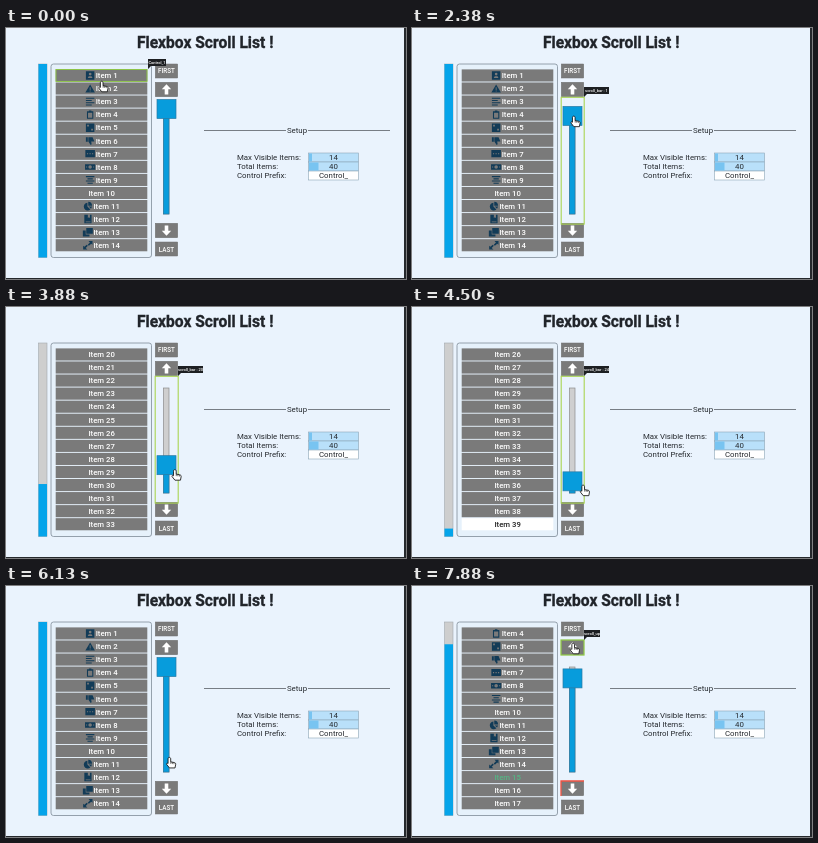
Write an HTML page that moves like this. It is 400 px wide and 251 px high and loops after 8 s.

```html
<!DOCTYPE html>
<html lang="en">
<head>
<meta charset="utf-8">
<title>Flexbox Scroll List</title>
<style>
html, body { margin: 0; width: 100%; height: 100%; overflow: hidden; background: #eaf3fd; }
svg { display: block; width: 100%; height: 100%; font-family: Roboto, Arial, sans-serif; }
</style>
</head>
<body>
<svg id="stage" viewBox="0 0 400 251">
  <rect width="400" height="251" fill="#eaf3fd"/>
  <path d="M398 0h2v251H0v-1h398z" fill="#25282c"/>
  <text x="199.2" y="20.4" font-size="15.6" font-weight="700" text-anchor="middle" fill="#20242a" stroke="#20242a" stroke-width=".35">Flexbox Scroll List !</text>
  <g fill="none" stroke="#5a6068" stroke-width=".8"><path d="M198 102.5H280M302 102.5H384"/></g>
  <g font-size="7.85" fill="#24282d">
    <text x="291" y="105.3" text-anchor="middle">Setup</text>
    <text x="231" y="132.2">Max Visible Items:</text>
    <text x="231" y="141.2">Total Items:</text>
    <text x="231" y="150.3">Control Prefix:</text>
  </g>
  <g stroke="#8ba3b5" stroke-width=".6">
    <rect x="302.5" y="125" width="50" height="9" fill="#b9e0fa"/>
    <rect x="302.5" y="134" width="50" height="9" fill="#b9e0fa"/>
    <rect x="302.5" y="143" width="50" height="9" fill="#fff"/>
  </g>
  <path d="M303 125.5h3v8h-3zM303 134.5h9.5v8h-9.5z" fill="#78c4f1"/>
  <g font-size="7.85" fill="#24282d" text-anchor="middle">
    <text x="327.5" y="132.2">14</text>
    <text x="327.5" y="141.2">40</text>
    <text x="327.5" y="150.3">Control_</text>
  </g>
  <rect x="45" y="36" width="100.5" height="193.5" rx="2.5" fill="#e6f1fb" stroke="#7f8c98" stroke-width=".8"/>
  <g id="live"></g>
  <g id="hand">
    <path d="M0 .3C1.2 .3 1.6 1 1.6 2V5L5.5 5.8C6.6 6 7 6.7 6.9 7.7L6.2 11.5H.3L-2.7 7.7C-3.3 6.7-2 5.9-1.2 6.8V2C-1.2 1-.9 .3 0 .3Z" fill="#fff" stroke="#111" stroke-width=".9"/>
    <path d="M1.7 5V7.2M3.4 5.5V7.4M5.1 6V7.6" stroke="#111" stroke-width=".6"/>
  </g>
</svg>
<script>
const LOOP = 8000, ROWS = 14, TOTAL = 40, PITCH = 13.06;
const BLUE = '#079cdc', BAR_BLUE = '#05a4ea', GRAY = '#7a7a7a', NAVY = '#123b57';
const GREEN = '#8cc63f', ORANGE = '#f2703a';

// Glyphs live in an 8 x 8 box.
const ICONS = {
  1: 'M0 0H8V8H0ZM4 1.4A1.3 1.3 0 0 0 4 4A1.3 1.3 0 0 0 4 1.4ZM1.7 6.5H6.3L5.3 4.7H2.7Z',
  2: 'M4 .2L8.5 7.8H-.5ZM3.6 2.8V5.3H4.4V2.8ZM3.6 6V6.9H4.4V6Z',
  3: 'M0 .4H8V1.4H0ZM0 2.5H5.5V3.5H0ZM0 4.6H8V5.6H0ZM0 6.7H5.5V7.7H0Z',
  4: 'M1 .8H2.8V0H5.2V.8H7V8H1ZM2 2.2V7H6V2.2Z',
  5: 'M0 0H8V8H0ZM1.2 1.2V2.8H2.8V1.2ZM5 5V6.6H6.6V5Z',
  6: 'M0 .8H1.8V5H0ZM2.3 .6H6.3L8 4.8H5L5.4 7.2L4.5 8L2.3 4.6Z',
  7: 'M-.5 .5H8.5V7.2H-.5ZM1 3.4V4.5H2.1V3.4ZM3.4 3.4V4.5H4.5V3.4ZM5.8 3.4V4.5H6.9V3.4Z',
  8: 'M-.8 1.5H8.8V6.7H-.8ZM4 2.4A1.7 1.7 0 0 0 4 5.8A1.7 1.7 0 0 0 4 2.4ZM.2 3.6V4.6H1.2V3.6ZM6.8 3.6V4.6H7.8V3.6Z',
  9: 'M0 .4H8V1.4H0ZM1.5 2.5H6.5V3.5H1.5ZM0 4.6H8V5.6H0ZM1.5 6.7H6.5V7.7H1.5Z',
  11: 'M3.6 .8V4.5L6.4 7.2A3.7 3.7 0 1 1 3.6 .8ZM4.4 0A3.8 3.8 0 0 1 8 3.7H4.4ZM4.8 4.5H8L7 6.6Z',
  12: 'M.7 0H7.5V8H.7ZM2 6.2V7H6.5V6.2ZM4 0V3L5 2.2L6 3V0Z',
  13: 'M2.5 0H8.7V5.6H2.5ZM-.7 2.4H2V6.1H5.5V8H-.7Z',
  14: 'M4.6 0H8.4V3.6L7.2 2.5L5 4.6L3.9 3.5L6 1.4ZM3.6 8H-.4V4.4L.8 5.5L2.9 3.5L4 4.6L2 6.6Z'
};

const VALUE = [[2250, 0], [3250, 14], [4350, 25], [4500, 24.6], [5230, 0]];
const POINTER = [
  [0, 95.5, 53], [700, 95.5, 53], [1100, 97.5, 65], [1500, 97.5, 65], [2050, 161, 80], [2250, 161, 80],
  [3250, 165.5, 140], [4350, 171, 179], [4500, 171, 178], [5250, 168.5, 71],
  [5600, 168.5, 71], [6300, 161.5, 203], [7330, 161.5, 203], [7750, 161, 57], [8000, 161, 57]
];
const CLICKS = [6720, 7000, 7230];

function sample(keys, t, column = 1) {
  const next = keys.findIndex(k => k[0] > t);
  if (next === 0) return keys[0][column];
  if (next < 0) return keys[keys.length - 1][column];
  const a = keys[next - 1], b = keys[next];
  return a[column] + (b[column] - a[column]) * (t - a[0]) / (b[0] - a[0]);
}

const scrollValue = t => sample(VALUE, t) + CLICKS.filter(c => t >= c).length;

const rect = (x, y, w, h, fill, stroke = 'none', sw = .7) =>
  `<rect x="${x}" y="${y}" width="${w}" height="${h}" fill="${fill}" stroke="${stroke}" stroke-width="${sw}"/>`;

const label = (x, y, size, text, fill = '#fff', anchor = 'middle') =>
  `<text x="${x}" y="${y}" font-size="${size}" font-weight="500" fill="${fill}" text-anchor="${anchor}">${text}</text>`;

function listRow(row, first) {
  const n = first + row, y = 41.4 + row * PITCH, icon = ICONS[n];
  const white = n === 39;
  const ink = white ? '#222' : n === 15 ? '#55b585' : '#fff';
  const textWidth = n < 10 ? 21.8 : 26.4;
  const left = 95.7 - (textWidth + 9) / 2;
  let out = rect(49.7, y, 91.6, 12.1, white ? '#fff' : GRAY);
  if (icon) {
    out += `<path transform="translate(${left - .4} ${y + 1.8}) scale(1.06)" d="${icon}" fill="${NAVY}" fill-rule="evenodd"/>`;
    out += label(left + 9.4, y + 8.8, 7.75, `Item ${n}`, ink, 'start');
  } else {
    out += label(95.6, y + 8.8, 7.75, `Item ${n}`, ink);
  }
  return out;
}

function button(y, h, content, fill = GRAY) {
  return rect(149.3, y, 22.4, h, fill, '#6e6e6e', .5) + content;
}

function arrow(y, dir) {
  return `<path transform="translate(160.5 ${y}) scale(1 ${dir})" d="M0-5.3L4.7-.3H1.8V5H-1.8V-.3H-4.7Z" fill="#fff"/>`;
}

function tooltip(x, y, w, text) {
  return `<path d="M${x} ${y}h${w}v7h${-w + 3}l-3 3z" fill="#1d1f22"/>` +
    label(x + w / 2, y + 5, 4, text);
}

const outline = (x, y, w, h, color, sw = 1.2) => rect(x, y, w, h, 'none', color, sw);

function hoverLayer(t, value) {
  if (t < 1000) return outline(50, 41.5, 91, 11.9, GREEN, .9) + tooltip(142, 31, 18, 'Control_1');
  if (t < 1600) {
    const color = t >= 1150 && t < 1450 ? ORANGE : GREEN;
    return outline(49.5, 54.4, 92, 12.4, color) + tooltip(142, 44, 18, 'Control_2');
  }
  if (t >= 2000 && t < 5800) {
    return outline(149.2, 69.3, 23, 126.8, '#a9d552', 1.1) +
      tooltip(172, 59, 25, `scroll_bar : ${Math.max(1, Math.floor(value))}`);
  }
  if (t >= 6200 && t < 7420) return outline(149, 195, 23, 15, GREEN) + tooltip(172, 185, 21, 'scroll_down');
  if (t >= 7650) return outline(149, 54, 23, 15, GREEN) + tooltip(172, 44, 16, 'scroll_up');
  return '';
}

function controls(t, value) {
  const center = 81 + value * 3.8;
  const pressed = CLICKS.some(c => t >= c && t < c + 190);
  return button(36, 14, label(160.5, 45.4, 6.3, 'FIRST')) +
    button(54.3, 14.4, arrow(61.6, 1)) +
    rect(157.5, 81, 5.5, 105, '#cfcfcf', '#8b8b8b') +
    rect(157.5, center, 5.5, 186 - center, BLUE, '#287aa3') +
    rect(151, center - 9.5, 19, 19, BLUE, '#287aa3') +
    button(195.3, 14.4, arrow(202.4, -1), pressed ? '#fff' : GRAY) +
    button(214, 14, label(160.5, 223.5, 6.3, 'LAST'));
}

const live = document.getElementById('live');
const hand = document.getElementById('hand');
let shown = '';

function render(t) {
  const value = scrollValue(t);
  const offset = Math.round(scrollValue(t - 140)); // the list trails the slider
  const cut = 36 + offset * 193 / (TOTAL - ROWS);
  let out = rect(32.5, 36, 8.5, 193.5, '#cecece', '#a2a8ad', .6) +
    rect(32.5, cut, 8.5, 229.5 - cut, BAR_BLUE);
  for (let row = 0; row < ROWS; row++) out += listRow(row, offset + 1);
  out += controls(t, value) + hoverLayer(t, value);
  if (t >= CLICKS[0]) out += '<path d="M149 210V195H172" fill="none" stroke="#ef5040" stroke-width="1.3"/>';
  if (out !== shown) live.innerHTML = shown = out;
  hand.setAttribute('transform', `translate(${sample(POINTER, t, 1)} ${sample(POINTER, t, 2)}) scale(.94)`);
}

const start = performance.now();
function tick() {
  render((performance.now() - start) % LOOP);
  requestAnimationFrame(tick);
}
tick();
</script>
</body>
</html>
```
